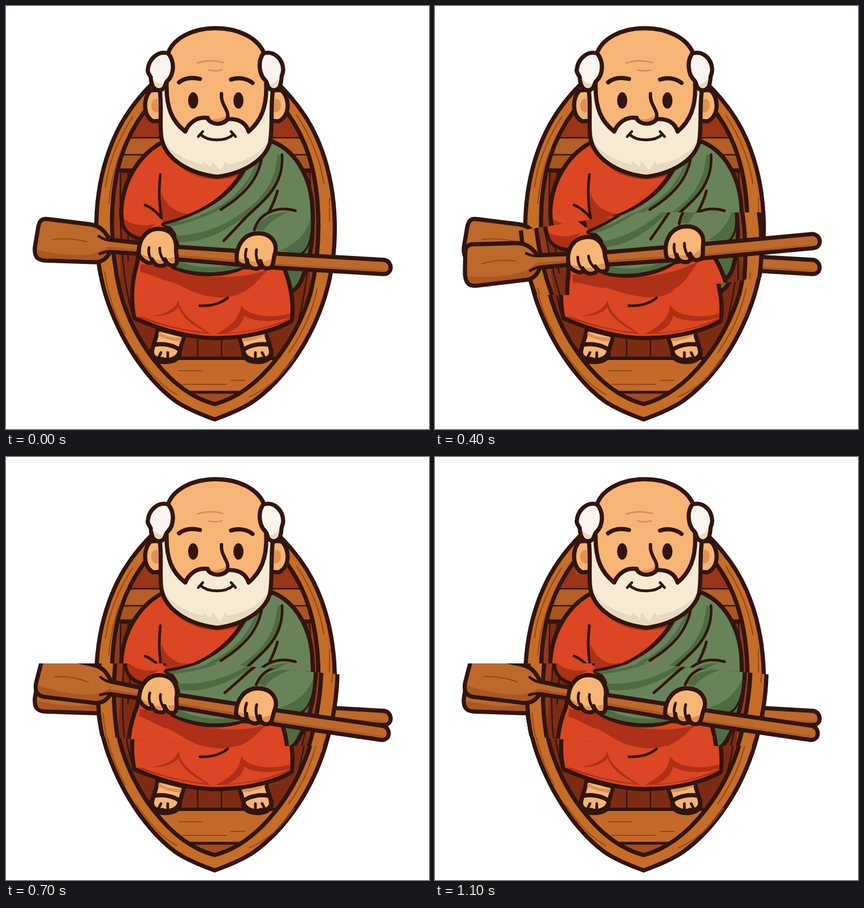
Write an HTML page that moves like this. It is 748 px wide and 748 px high and loops after 1200 ms.

```html
<!DOCTYPE html>
<html lang="en">
<head>
<meta charset="utf-8">
<title>Rower</title>
<style>
  html, body { margin: 0; width: 100%; height: 100%; overflow: hidden; background: #fff; }
  svg { display: block; width: 100vw; height: 100vh; }
  path, ellipse { stroke-linecap: round; stroke-linejoin: round; }
  .ink { stroke: #32150f; stroke-width: 7.4; }
  .mid { stroke: #32150f; stroke-width: 6; fill: none; }
  .fine { stroke: #32150f; stroke-width: 4.8; fill: none; }
  .thin { stroke: #32150f; stroke-width: 2.5; fill: none; }
  .line { fill: none; }
  .wood { fill: #c66d27; }
  .grain { stroke: #93481a; stroke-width: 2; fill: none; }
  .hull { fill: #7d2c13; }
  .oar { fill: #bd692c; }
  .oarShade { fill: #aa5722; }
  .red { fill: #da4722; }
  .redShade { fill: #ae3016; }
  .green { fill: #68835a; }
  .greenShade { fill: #4f6b43; }
  .skin { fill: #f6b575; }
  .skinShade { fill: #df9152; }
  .hair { fill: #f9f5ee; }
  .beard { fill: #f6ead3; }
  .beardShade { fill: #e6d9bd; }
  .dark { fill: #32150f; }
</style>
</head>
<body>
<svg viewBox="0 0 748 748">
  <defs>
    <clipPath id="strip"><rect x="45" y="365" width="640" height="146"/></clipPath>
    <clipPath id="inside"><path id="rim" d="M369 90C300 120 243 172 213 242C181 315 181 420 202 506C222 584 286 682 369 704C452 682 517 584 539 506C559 420 558 315 527 242C498 172 440 120 369 90Z"/></clipPath>
  </defs>

  <g id="scene">
    <g id="boat">
      <path class="wood ink" d="M369 60C294 94 223 160 191 234C151 325 151 440 181 526C209 604 254 664 299 698C316 710 344 722 369 731C394 722 422 710 439 698C486 664 533 604 560 526C590 440 590 325 550 234C518 160 444 94 369 60Z"/>
      <g clip-path="url(#inside)">
        <path class="hull" d="M150 80H600V720H150Z"/>
        <path fill="#9a3517" d="M217 190H525V233H217Z"/>
        <path fill="#b55f26" d="M180 233H560V290H180Z"/>
        <path fill="#a9551f" d="M180 264H560V290H180Z"/>
        <path class="thin" d="M180 233H560M180 263H560"/>
        <path class="ink line" d="M180 291H560"/>
        <path fill="#92391a" d="M188 294H202V500L188 440ZM538 294H552V450L538 490Z"/>
        <path class="thin" d="M203 294C200 370 203 470 222 540M216 294V450M537 294C542 370 538 480 516 560M339 590V624M381 590V624"/>
        <path fill="#c36a2a" d="M240 624H500V682H240Z"/>
        <path fill="#a24b20" d="M240 682H500V710H240Z"/>
        <path class="mid" d="M240 623H500"/>
        <path class="fine" d="M300 683H440"/>
        <path class="grain" d="M306 645H348M312 669H390M398 662H423"/>
      </g>
      <use href="#rim" class="ink line"/>
      <path class="grain" d="M224 196C198 235 181 279 176 320M204 254C190 290 184 320 182 350M174 470C181 513 194 550 211 580M231 615C255 650 280 676 302 687M514 193C542 235 556 274 562 314M572 340V380M550 500C541 544 522 582 500 613M510 621C484 659 458 680 430 691"/>
    </g>

    <g id="feet">
      <g id="leftFoot">
        <path class="dark" d="M254 606C251 626 266 635 286 633C302 632 311 624 311 613Z"/>
        <path class="skin ink" d="M268 571C267 588 261 594 259 607C255 620 267 626 276 624C286 629 304 624 307 611L315 583Z"/>
        <path class="skinShade" d="M270 576C280 584 299 588 311 586L309 593C293 593 279 588 269 582Z"/>
        <path class="ink line" d="M262 599C278 596 297 600 307 608"/>
        <path class="fine" d="M274 613L270 621M286 613V624"/>
      </g>
      <use href="#leftFoot" transform="matrix(-1 0 0 1 727 0)"/>
    </g>

    <g id="robe">
      <path class="greenShade ink" d="M535 350C551 394 536 455 524 480C520 493 514 500 505 505L480 440Z"/>
      <path class="red ink" d="M278 240C235 262 207 310 204 360C202 390 215 406 238 412L232 455C221 490 221 525 227 552C285 577 335 589 380 587C432 586 481 572 505 557C510 530 504 493 492 464L450 250Z"/>
      <path class="redShade" d="M281 251C305 297 355 318 414 300L418 294L374 303C330 299 291 273 281 251ZM275 330C282 354 304 369 330 367C312 377 296 383 279 385L273 372ZM208 376C225 389 245 390 266 385L250 396L238 408C218 404 209 393 208 376Z"/>
      <path class="redShade" d="M238 457H284L300 465C345 484 422 484 464 465L450 480C428 508 397 519 365 514C333 511 312 495 293 488C271 484 256 474 238 470Z"/>
      <path class="redShade" d="M305 520C308 548 340 564 362 580C325 577 276 567 229 549C265 552 299 541 305 520ZM371 580C404 563 414 548 416 528C425 549 470 553 502 544L503 554C475 569 421 580 371 580Z"/>
      <path class="red" d="M231 545C266 553 296 546 305 532C312 555 338 568 354 577C318 573 270 563 231 545ZM392 578C412 569 419 559 421 547C435 559 474 560 501 551L500 553C461 569 426 577 392 578Z"/>
      <path class="fine" d="M343 530C365 531 381 525 392 516"/>
      <path class="fine" d="M273 298C269 328 271 351 275 375C265 362 256 356 246 352"/>

      <path class="green ink" d="M470 239C517 258 541 310 542 362C545 397 535 428 518 441L478 438V462H420C381 480 333 477 296 462L303 427C302 406 291 391 278 386C340 371 393 342 424 284Z"/>
      <path class="greenShade" d="M452 268C441 300 419 333 387 355C354 374 317 386 290 390L280 387C348 370 400 339 427 287ZM485 265C486 320 458 346 429 367C391 397 351 419 305 417L300 406C371 400 420 365 446 334C467 310 478 290 480 262Z"/>
      <path class="green" d="M441 281C427 315 403 339 377 354C346 371 319 380 300 382C355 363 405 335 428 287ZM478 278C473 312 454 340 425 360C391 387 351 403 306 406L298 397C370 393 420 356 444 330C462 310 470 292 474 270Z"/>
      <path class="greenShade" d="M304 450C332 465 381 465 414 455L420 461C382 474 335 474 299 461ZM485 432C510 423 530 405 539 375C541 411 532 434 517 438ZM440 394C452 374 472 366 500 364C475 375 462 386 455 398Z"/>
      <path class="fine" d="M453 264C447 309 417 337 380 360M488 263C492 323 450 347 421 377C406 393 396 404 385 415M466 362C473 349 477 338 480 327M512 362C480 353 448 365 439 396"/>
    </g>

    <g id="oar">
      <path class="oar ink" d="M76 377C64 375 59 379 57 391L51 427C50 443 55 449 68 450L157 453C171 453 178 446 184 435L235 438L303 448L408 457L480 463L668 474C684 474 684 452 669 449L480 438L408 433L303 426L235 419L183 413C174 396 164 388 148 386Z"/>
      <path class="oarShade" d="M56 431C95 441 150 446 174 430L180 426L235 430L303 440L408 449L480 456L668 467L674 469L480 459L408 453L303 444L235 434L182 431C176 443 169 449 157 449L68 446C59 446 55 441 56 431Z"/>
      <path class="grain" d="M83 413C105 410 124 412 143 417"/>
      <path class="fine" d="M164 407C173 413 179 414 184 414M166 438C173 435 179 434 184 434"/>
    </g>

    <g id="hands">
      <path class="skin ink" d="M235 440C233 415 247 394 270 394C290 394 300 407 301 426C299 436 306 453 299 458C290 461 285 456 281 448C284 456 281 460 275 459C266 460 261 455 258 448C260 454 255 456 249 453C242 450 238 445 235 440Z"/>
      <path class="skinShade" d="M240 439L253 444V449C247 449 243 445 240 439ZM263 448L277 450L276 456C268 457 265 453 263 448ZM287 446L298 444V454C293 456 288 451 287 446Z"/>
      <path class="fine" d="M253 427C251 436 254 445 258 450M272 428C271 437 276 447 281 452"/>
      <path class="skin ink" d="M408 450C406 425 420 402 446 402C470 402 480 420 476 436C472 448 474 460 467 463C457 466 452 461 450 451C453 462 446 466 438 464C429 462 427 456 426 449C427 457 423 460 417 458C412 456 409 454 408 450Z"/>
      <path class="skinShade" d="M412 447L423 449V455C417 456 413 452 412 447ZM430 451L446 453L445 460C435 461 431 456 430 451ZM455 453L470 447L466 459C459 462 456 459 455 453Z"/>
      <path class="fine" d="M425 430C422 440 424 450 427 456M443 431C441 441 444 453 449 459"/>
    </g>

    <g id="head">
      <path class="skin ink" d="M256 149C242 162 242 194 260 204L277 203V148ZM487 149C502 162 503 194 482 204L467 203V148Z"/>
      <path class="skinShade" d="M268 164C257 163 254 177 260 185C264 189 268 189 270 187ZM475 164C486 163 489 177 483 185C479 189 475 189 473 187Z"/>
      <path class="skin ink" d="M285 88C302 24 437 22 458 88L464 205L420 245H325L280 205Z"/>
      <path class="beard ink" d="M272 148C276 182 271 212 275 234C282 270 322 296 374 302C425 295 465 268 468 233C471 207 468 178 472 148L460 137C462 180 450 204 429 222C424 206 412 199 392 200C384 211 362 211 356 198C338 195 323 207 317 222C294 204 283 181 284 137Z"/>
      <path class="beardShade" d="M281 240C291 268 325 292 374 298C420 291 456 267 464 238C450 262 420 277 391 280L389 274L379 291L365 275L362 285L348 274L349 281C322 274 295 262 281 240Z"/>
      <path class="hair ink" d="M287 84C269 78 253 94 251 111C249 118 254 121 256 126C257 144 266 152 275 148C283 145 281 135 286 132C297 121 299 99 287 84ZM455 84C474 78 489 94 490 111C491 119 487 122 487 128C486 145 478 152 469 148C461 145 463 136 459 132C447 121 445 97 455 84Z"/>
      <path class="beardShade" d="M259 127C264 134 270 138 278 138C275 146 268 147 263 141ZM484 127C478 134 473 138 466 139C469 146 476 147 481 141Z"/>
      <path class="skin" d="M381 161C381 178 394 185 391 197C385 209 362 209 358 197L366 185Z"/>
      <path class="skinShade" d="M360 199C368 202 382 200 390 192C393 201 382 206 371 206C364 205 361 203 360 199Z"/>
      <path class="mid" d="M381 155C379 174 395 184 392 198C386 211 360 211 357 197"/>
      <path class="ink line" d="M306 135C316 127 330 126 343 129M398 130C410 126 425 127 436 136"/>
      <ellipse class="dark" cx="331" cy="167" rx="9" ry="14.5"/>
      <ellipse class="dark" cx="411" cy="167" rx="9" ry="14.5"/>
      <path fill="none" stroke="#de8b4c" stroke-width="2.6" d="M338 101C353 96 370 96 384 100M358 113C366 115 375 115 382 113"/>
      <path class="fine" d="M344 227C357 240 389 240 402 227M340 231L348 222M398 222L406 231"/>
    </g>
  </g>

  <g clip-path="url(#strip)">
    <g id="stroke">
      <g clip-path="url(#strip)"><use href="#scene"/></g>
    </g>
  </g>
</svg>

<script>
  const STEP_MS = 100, STEPS = 12, SWING = 10;
  const PIVOT = "365 438";
  const strip = document.getElementById("stroke");

  function draw(time) {
    const step = Math.floor(time / STEP_MS + 1e-3) % STEPS;
    const angle = -SWING * Math.sin(2 * Math.PI * step / STEPS);
    strip.setAttribute("transform", `rotate(${angle.toFixed(3)} ${PIVOT})`);
    strip.style.display = step % 6 ? "" : "none";
  }

  function tick(now) {
    draw(now);
    requestAnimationFrame(tick);
  }

  draw(0);
  requestAnimationFrame(tick);
</script>
</body>
</html>
```
